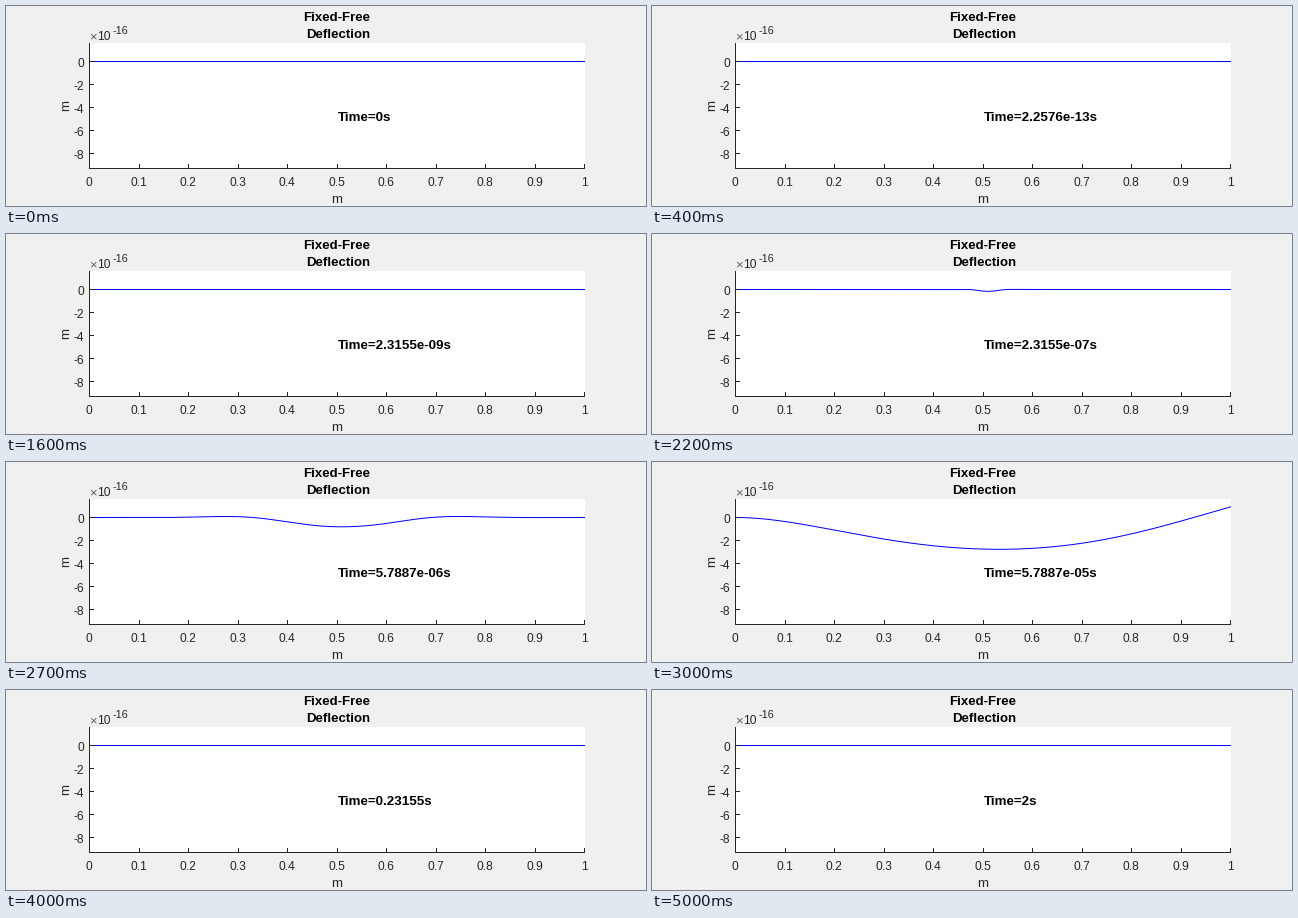
These frames come from a looping animation (640x200 px, 5.1 s). A matplotlib script:

```python
import math

import numpy as np
import matplotlib.pyplot as plt
from matplotlib.animation import FuncAnimation
from matplotlib.patches import Rectangle

W, H, DPI = 640, 200, 100
FRAMES, INTERVAL = 51, 100

# stage geometry in pixels
LEFT, RIGHT, TOP, BOTTOM = 83.5, 578.7, 37.0, 162.5
ZERO_Y, UNIT = 55.5, 11.44        # row of zero, pixels per 1e-16 m
INK = (0.15, 0.15, 0.15)

# beam and solver settings
STIFFNESS = 948.0                 # sqrt(EI / rho A)
HIT = 0.51                        # where the impulse acts
DEEPEST = 9.27                    # largest deflection, in 1e-16 m
FIRST_STEP, MAX_STEP, T_END = 1.7366e-14, 0.2, 2.0
KAPPA = 0.185
MODES = 100


def time_steps():
    """Step grows tenfold after every three steps, up to a ceiling."""
    steps = [min(FIRST_STEP * 10.0 ** (n // 3), MAX_STEP)
             for n in range(FRAMES - 2)]
    return np.array(steps + [T_END - sum(steps)])


def cantilever_roots():
    beta = (np.arange(1, MODES + 1) - 0.5) * np.pi
    for _ in range(8):
        g = np.cos(beta) + 1 / np.cosh(beta)
        beta = beta + g / (np.sin(beta) + np.tanh(beta) / np.cosh(beta))
    return beta


def mode_shapes(beta, x):
    """Fixed-free mode shapes, one row per position."""
    x = np.atleast_1d(x)[:, None]
    scale = np.sinh(beta) + np.sin(beta)
    rest = (np.sin(beta) - np.cos(beta) - np.exp(-beta)) / scale
    sigma = 1 - rest
    return (np.exp(-beta * x) * (1 + sigma) / 2
            + np.exp(beta * x) * rest / 2
            - np.cos(beta * x) + sigma * np.sin(beta * x))


def deflections(x, steps):
    """First-order NDF integration of each mode after a downward impulse."""
    beta = cantilever_roots()
    omega = STIFFNESS * beta ** 2
    z = np.ones(MODES, complex)
    diff = 1j * omega * steps[0] * z
    amps = [z.imag / omega]
    last = steps[0]
    for h in steps:
        u = 1j * omega * h
        diff = (KAPPA * diff * h / last + u * z) / (1 + KAPPA - u)
        z = z + diff
        last = h
        amps.append(z.imag / omega)
    weights = np.array(amps) * mode_shapes(beta, HIT)[0]
    w = -weights @ mode_shapes(beta, x).T
    return w * DEEPEST / -w.min()


x = np.linspace(0, 1, 301)
steps = time_steps()
times = np.concatenate(([0.0], np.cumsum(steps)))
times[-1] = T_END
shapes = deflections(x, steps)

plt.rcParams["font.family"] = "Liberation Sans"
fig = plt.figure(figsize=(W / DPI, H / DPI), dpi=DPI, facecolor="#f0f0f0")
ax = fig.add_axes([0, 0, 1, 1])
ax.set_xlim(0, W)
ax.set_ylim(H, 0)
ax.axis("off")


def pt(pixels):
    return pixels * 72 / DPI


def crisp(v):
    """Centre of the pixel that holds v."""
    return math.floor(v) + 0.5


def label(px, py, text, size=12, color=INK, ha="center", **kw):
    return ax.text(px, py, text, fontsize=pt(size), color=color, ha=ha,
                   va=kw.pop("va", "baseline"), **kw)


def rule(xs, ys):
    ax.plot(xs, ys, color=INK, lw=pt(1), solid_capstyle="butt",
            snap=False, zorder=3)


panel = Rectangle((83, TOP), 496, 126, facecolor="white", edgecolor="none",
                  zorder=0)
ax.add_patch(panel)

rule([LEFT, LEFT], [TOP, BOTTOM + 0.5])
rule([LEFT - 0.5, 579], [BOTTOM, BOTTOM])
for k in range(11):
    px = LEFT + (RIGHT - LEFT) * k / 10
    rule([crisp(px)] * 2, [BOTTOM - 4.5, BOTTOM])
    label(px - 0.3, 180, f"{k / 10:g}")
for v in range(0, -9, -2):
    py = ZERO_Y - UNIT * v
    rule([LEFT, LEFT + 4.5], [crisp(py)] * 2)
    label(78.5, py + 5.5, str(v), ha="right")

label(331, 15, "Fixed-Free", 13.2, "black", weight="bold")
label(332, 32, "Deflection", 13.2, "black", weight="bold")
label(331, 197, "m", 13.2)
label(60.5, 99.2, "m", 13.2, rotation=90, va="center")
label(83.5, 34, "\u00d7", 13, "#606060", ha="left")
label(91.3, 34, "10", ha="left")
label(106.6, 28, "-16", 10.7, ha="left")

clock = label(331.6, 115, "", 13.33, "black", ha="left", weight="bold")
beam, = ax.plot([], [], color="blue", lw=pt(1), snap=False, zorder=2,
                solid_joinstyle="round")
clip = Rectangle((83, TOP - 0.5), 496, 127, transform=ax.transData)
beam.set_clip_path(clip)


def draw(i):
    beam.set_data(LEFT + (RIGHT - LEFT) * x, ZERO_Y - UNIT * shapes[i])
    clock.set_text(f"Time={times[i]:.5g}s")
    return beam, clock


anim = FuncAnimation(fig, draw, frames=FRAMES, interval=INTERVAL,
                     repeat=True, repeat_delay=0)
plt.show()
```
